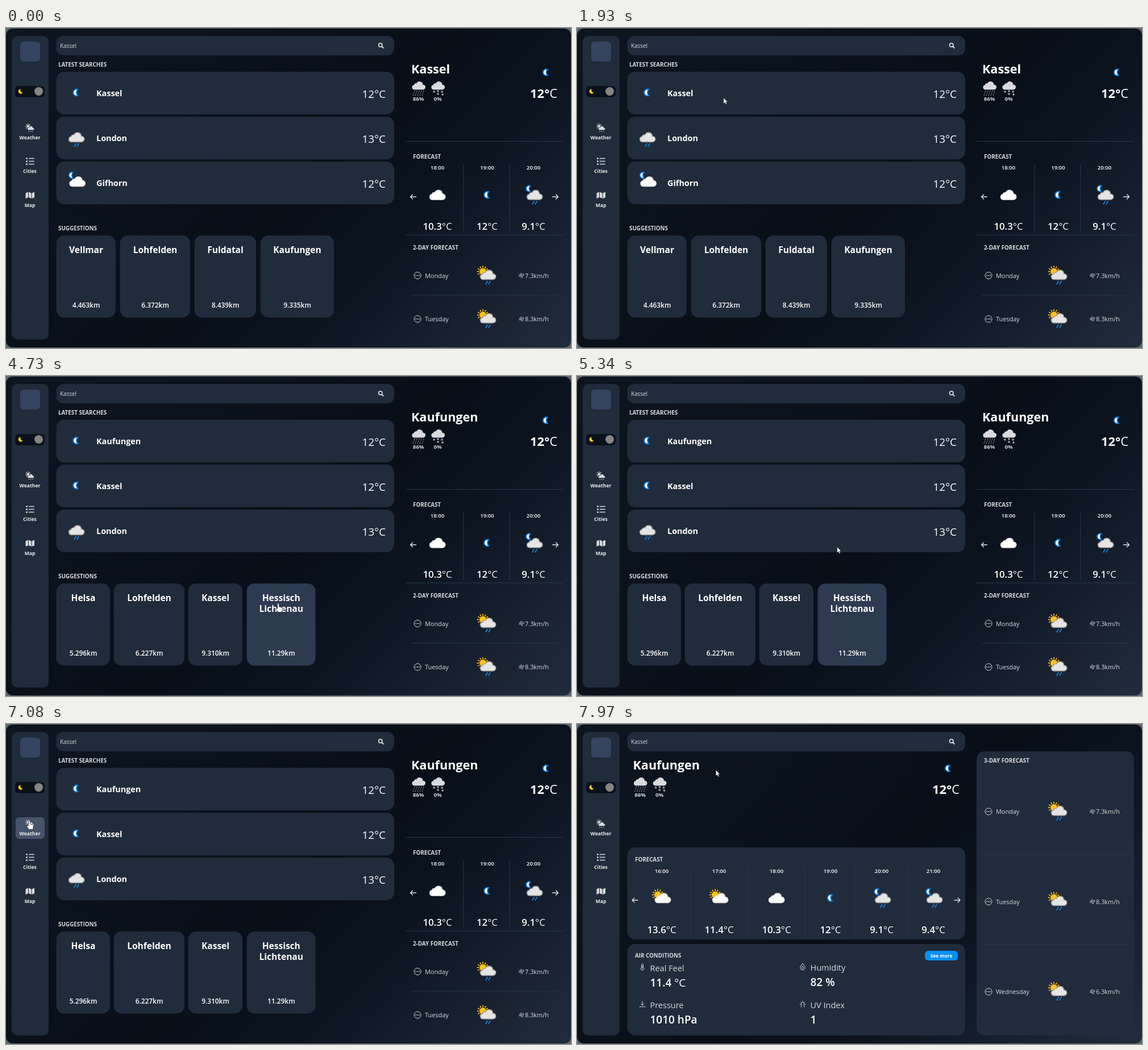
Animation of 994 by 563 pixels, one loop 8000 ms. Source, as an HTML page:

```html
<!DOCTYPE html>
<html lang="en">
<head>
<meta charset="utf-8">
<title>Weather app</title>
<style>
html, body { margin: 0; width: 100%; height: 100%; overflow: hidden; background: #62666c; }
svg { display: block; width: 994px; height: 563px; font-family: "Open Sans", "Noto Sans", sans-serif; }
</style>
</head>
<body>
<svg id="stage" viewBox="0 0 994 563"></svg>
<script>
const CARD = '#202b3b', PALE = '#d8dade';

// Drawing helpers, all returning SVG markup
const at = (x, y, body, more = '') => `<g transform="translate(${x} ${y}) ${more}">${body}</g>`;
const box = (x, y, x2, y2, r = 14, fill = CARD, id = '') =>
  `<rect ${id && `id="${id}"`} x="${x}" y="${y}" width="${x2 - x}" height="${y2 - y}" rx="${r}" fill="${fill}"/>`;
const stroke = (d, color = PALE, w = 1.2) =>
  `<path d="${d}" fill="none" stroke="${color}" stroke-width="${w}" stroke-linecap="round" stroke-linejoin="round"/>`;
const rule = (d, color = '#29384a') => `<path d="${d}" stroke="${color}" fill="none"/>`;
const text = (x, y, s, size, weight = 600, anchor = 'start', fill = '#fff') =>
  `<text x="${x}" y="${y}" font-size="${size}" font-weight="${weight}" text-anchor="${anchor}" fill="${fill}">${s}</text>`;
const mid = (x, y, s, size, weight = 600, fill = '#fff') => text(x, y, s, size, weight, 'middle', fill);
const heading = (x, y, s) => text(x, y, s, 9.8, 700, 'start', PALE);
const unit = s => `<tspan font-weight="400">${s}</tspan>`;
const dots = (points, r, fill = PALE) =>
  points.map(([x, y]) => `<circle cx="${x}" cy="${y}" r="${r}" fill="${fill}"/>`).join('');
const rays = (n, a, b) => Array.from({ length: n }, (_, i) => {
  const q = i * 2 * Math.PI / n, c = Math.cos(q), s = Math.sin(q);
  return `M${(a * c).toFixed(2)} ${(a * s).toFixed(2)}L${(b * c).toFixed(2)} ${(b * s).toFixed(2)}`;
}).join('');

// Weather icons, centred on the cloud
const CLOUD = 'M-9 8.5A4.800 4.800 0 0 1-9.500-1A4.200 4.200 0 0 1-4.500-4A6.800 6.800 0 0 1 8.500-1.500A5 5 0 0 1 9 8.500Z';
const CRESCENT = 'M4-5.500A6 6 0 1 0 4 5.500A7.500 7.500 0 0 1 4-5.500Z';
const cloud = (fill, edge) => `<path d="${CLOUD}" fill="${fill}" stroke="${edge}" stroke-width="1.500"/>`;
const white = cloud('#fff', '#ececec');
const drops = stroke('M-1 11.500l-3 5M4 11.500l-3 5', '#1688e5', 1.6);
const rain = cloud('#e5e5e5', '#9c9c9c') + drops;
const moon = `<path d="${CRESCENT}" fill="#fff" stroke="#0875d1" stroke-width="2"/>`;
const sun = at(-9, -5.5, stroke(rays(12, 7.5, 9.5), '#ffb000', 1.8) + dots([[0, 0]], 6, '#ffc21c'));
const small = at(-11, -11, moon, 'scale(.9)');
const icons = {
  moon, rain, cloud: white,
  moonCloud: small + white,
  moonRain: small + rain,
  sunCloud: sun + cloud('#fff', '#dcdcdc'),
  sunRain: sun + rain
};
const icon = (name, x, y) => at(x, y, icons[name]);

const wind = stroke('M-4-1.700H-.5a1.100 1.100 0 1 0-1.100-1.100M-4.500 0H3a1.300 1.300 0 1 0-1.300-1.300M-4 1.700H1a1.100 1.100 0 1 1-1.100 1.100', PALE, .75);
const arrow = (x, y, dir) => at(x, y, stroke('M-5 0H5M-1-4L-5 0L-1 4', '#e2e4e7', 1.3), `scale(${dir} 1)`);
const flake = (x, y) => at(x, y, stroke(rays(6, 0, 1.8), PALE, .7));

function current(city, x, tempX) {
  const puff = `<path d="${CLOUD}" fill="${PALE}" transform="scale(.87)"/>`;
  let dashes = '';
  for (let row = 0; row < 3; row++)
    for (let i = 0; i < 5; i++) dashes += `M${-7 + i * 4 - row * 1.2} ${9.5 + row * 3.4}l-.5 1.200`;
  return text(x, 80, city, 21.6, 700) +
    at(x + 13, 101, puff + stroke(dashes, PALE, .8)) +
    at(x + 47, 101, puff + flake(-7, 11) + flake(0, 15) + flake(0, 10) + flake(7, 11) + flake(8, 16)) +
    mid(x + 12.5, 128, '86%', 9.5, 700, PALE) + mid(x + 46.5, 128, '0%', 9.5, 700, PALE) +
    at(tempX - 21, 78, moon, 'scale(.95)') +
    text(tempX, 122.500, '12°' + unit('C'), 21.8, 700, 'end');
}

const hour = (x, y, time, name, temp) =>
  mid(x, y, time, 9.6) +
  icon(name, x + ({ moon: -1, moonRain: 2, sunCloud: 2 }[name] || 0), y + 44.5) +
  mid(x, y + 106, temp + unit('°C'), 16.8);

const day = (y, name, speed) =>
  `<circle cx="724" cy="${y}" r="6" fill="none" stroke="${PALE}"/>` +
  dots([[721, y], [724, y], [727, y]], .9) +
  text(737, y + 4, name, 10.9, 400, 'start', PALE) +
  icon('sunRain', 848, y - 1.5) + at(907, y, wind) +
  text(913, y + 4, speed + 'km/h', 10.9, 400, 'start', PALE);

const found = ([name, pic, temp], i) => {
  const y = 77 + i * 79, c = y + 37;
  const pos = pic === 'moon' ? [122.5, c - .5] : pic === 'rain' ? [124, c - 1] : [125.5, c - 2];
  return box(88.5, y, 683, y + 75) + icon(pic, ...pos) +
    text(159, c + 5.5, name, 14.4, 700) + text(668, c + 8.500, temp + '°C', 18.9, 500, 'end');
};

const suggestion = ([x, x2, name, km], i, all) =>
  box(x - .5, 365, x2, 509.5, 14, CARD, all.id + i) +
  name.split(' ').map((s, k) => mid((x + x2) / 2, 396 + k * 18.5, s, 15.5, 700)).join('') +
  mid((x + x2) / 2, 492, km + 'km', 11.9);

const home = (id, city, searches, near) => {
  near.id = id + 'Card';
  return `<g id="${id}">` + heading(92, 67.5, 'LATEST SEARCHES') + searches.map(found).join('') +
    heading(92, 356, 'SUGGESTIONS') + near.map(suggestion).join('') +
    current(city, 713, 970) +
    rule('M703 199.500H980M703 364H980M713 470H971M805 239V360M886 239V360') +
    heading(716, 229.5, 'FORECAST') +
    hour(759, 249, '18:00', 'cloud', '10.3') + hour(846.500, 249, '19:00', 'moon', '12') +
    hour(928, 249, '20:00', 'moonRain', '9.1') +
    arrow(716.5, 297, 1) + arrow(966.5, 297, -1) +
    heading(716, 390, '2-DAY FORECAST') + day(435.500, 'Monday', '7.3') + day(512, 'Tuesday', '8.3') + '</g>';
};

const reading = (x, y, label, value, symbol) =>
  at(x - 13.5, y - 7, symbol) + text(x, y, label, 14.500, 400, 'start', PALE) + text(x, y + 27, value, 19);

const weather = () => {
  const hours = [[149, '16:00', 'sunCloud', '13.6'], [250, '17:00', 'sunCloud', '11.4'], [351, '18:00', 'cloud', '10.3'],
    [446, '19:00', 'moon', '12'], [536, '20:00', 'moonRain', '9.1'], [627, '21:00', 'moonRain', '9.4']];
  return '<g id="weather">' + current('Kaufungen', 98.5, 673) +
    box(88.5, 217, 683, 379) + heading(102, 242, 'FORECAST') +
    rule('M199 250V375M300 250V375M401 250V375M490 250V375M581 250V375', '#2a3748') +
    hours.map(([x, time, name, temp]) => hour(x, 261.5, time, name, temp)).join('') +
    arrow(102, 310, 1) + arrow(669, 310, -1) +
    box(88.5, 387, 683, 548) + heading(102, 411, 'AIR CONDITIONS') +
    box(612, 399, 670, 416, 6, '#0390fc') + mid(641, 411, 'See more', 8.4, 700) +
    reading(128.500, 434.5, 'Real Feel', '11.4 ' + unit('°C'),
      stroke('M-1.500 1V-4a1.500 1.500 0 0 1 3 0V1a2.600 2.600 0 1 1-3 0M0-2V3', PALE, 1)) +
    reading(410.500, 434, 'Humidity', '82 %',
      stroke('M0-5.500C-2-3-4.300-.5-4.300 1.500a4.300 4.300 0 0 0 8.600 0C4.300-.5 2-3 0-5.500M0-1C-3 2-1.500 3.500 0 3.500S3 2 0-1', PALE, 1)) +
    reading(128.500, 500, 'Pressure', '1010 hPa', stroke('M0-5V2M-2.500-.5L0 2L2.500-.5M-5 4.500H5', PALE, 1)) +
    reading(410.500, 500, 'UV Index', '1',
      stroke('M-2.500 2V-1a2.500 2.500 0 0 1 5 0V2M-2.500 5V3M2.500 5V3M-5 0H-4M4 0H5M-3.500-4L-3-3.500M3.500-4L3-3.500M0-5.500V-5', PALE, 1)) +
    box(703, 48, 980, 548) + heading(716, 67.5, '3-DAY FORECAST') +
    rule('M712 230H971M712 388.500H971', '#2a3748') +
    day(154, 'Monday', '7.3') + day(312.5, 'Tuesday', '8.3') + day(471, 'Wednesday', '6.3') + '</g>';
};

const frame = `<defs><linearGradient id="sky" gradientUnits="userSpaceOnUse" x1="108" y1="-108" x2="886.500" y2="670.500">
  <stop stop-color="#0d1520"/><stop offset=".52" stop-color="#080f19"/>
  <stop offset=".67" stop-color="#0b131f"/><stop offset="1" stop-color="#212c3c"/></linearGradient></defs>` +
  box(0, 1, 994, 562, 12, 'url(#sky)') + box(10, 14, 75, 548, 10) +
  box(25, 24, 60, 59, 6, '#34445f') +
  box(16, 102, 68, 122, 6, '#0a111b') + dots([[57.5, 111.5]], 7.5, '#858585') +
  at(25, 112, `<path d="${CRESCENT}" fill="#ffcb14"/>`, 'rotate(-30) scale(.72)') +
  box(17, 164, 68, 202, 6, '#46546a', 'navHover') +
  at(39, 173, stroke(rays(8, 3.2, 4.6), PALE, 1.1) + dots([[0, 0]], 2.4)) +
  at(43.500, 176, `<path d="${CLOUD}" fill="${PALE}" stroke="${CARD}" stroke-width="2" transform="scale(.45)"/>` +
    stroke('M-3 5.500l-.5 1M0 5.500l-.5 1M3 5.500l-.5 1', PALE, 1)) +
  dots([[36.5, 229.5], [36.5, 234.5], [36.5, 239.5]], 1.500) + stroke('M40.500 229.500H49M40.500 234.500H49M40.500 239.500H49', PALE, 1.7) +
  `<path d="M34.500 290.500L39 288.500V298L34.500 300ZM40 288.500L44.500 290.500V300L40 298ZM45.500 290.500L50 288.500V298L45.500 300Z" fill="${PALE}"/>` +
  [['Weather', 196], ['Cities', 255], ['Map', 314.5]].map(([s, y]) => mid(42, y, s, 8.6, 700, '#e8eaed')).join('') +
  box(88.5, 14, 683, 48, 12) + text(95, 34.8, 'Kassel', 9.9, 400, 'start', PALE) +
  `<circle cx="658.700" cy="30" r="3.200" fill="none" stroke="${PALE}" stroke-width="1.700"/>` + stroke('M661.200 32.500L663.700 35', PALE, 2);

const pointer = `<g id="pointer" stroke="#10151c" stroke-width=".7" fill="#fff">
  <path id="tip" d="M0 0V10.500L2.500 8.300L4.100 12L6 11.200L4.400 7.600H7.500Z"/>
  <path id="hand" d="M-1.500 9V1.200a1.400 1.400 0 0 1 2.800 0V6l4.500 1q1.700.5 1.500 2.200l-.8 6.300H-.5L-4.500 10.500q.3-1.900 1.800-1.200Z"/></g>`;

const stage = document.getElementById('stage');
stage.innerHTML = frame +
  home('before', 'Kassel',
    [['Kassel', 'moon', 12], ['London', 'rain', 13], ['Gifhorn', 'moonCloud', 12]],
    [[89, 193, 'Vellmar', '4.463'], [201, 324, 'Lohfelden', '6.372'], [332, 440, 'Fuldatal', '8.439'], [448, 577, 'Kaufungen', '9.335']]) +
  home('after', 'Kaufungen',
    [['Kaufungen', 'moon', 12], ['Kassel', 'moon', 12], ['London', 'rain', 13]],
    [[89, 183, 'Helsa', '5.296'], [190, 314, 'Lohfelden', '6.227'], [321, 416, 'Kassel', '9.310'], [424, 544.5, 'Hessisch Lichtenau', '11.29']]) +
  weather() + pointer;

// Pointer stops: time, x, y
const path = [[460, 880, 553], [1220, 623, 353], [1930, 258, 123], [2060, 225, 105], [2600, 130, 25], [2870, 109, 28],
  [3700, 482, 313], [4130, 479, 400], [5200, 479, 400], [5340, 458, 301], [5800, 210, 125], [5950, 170, 106],
  [6100, 214, 108], [6500, 120, 145], [6870, 41, 170], [7290, 41, 170], [7770, 177, 71], [7890, 214, 86], [7970, 244, 81], [8000, 250, 80]];

const $ = id => document.getElementById(id);
const show = (id, on) => $(id).setAttribute('display', on ? 'inline' : 'none');
const within = (t, a, b) => t >= a && t < b;

function draw(now) {
  const t = now % 8000;
  show('before', t < 4470);
  show('after', within(t, 4470, 7150));
  show('weather', t >= 7150);
  show('navHover', within(t, 6840, 7430));
  $('beforeCard3').setAttribute('fill', t >= 4060 ? '#2d3a50' : CARD);
  $('afterCard3').setAttribute('fill', t < 5410 ? '#2d3a50' : CARD);

  const hand = within(t, 4020, 5270) || within(t, 6840, 7360);
  show('pointer', t >= 460);
  show('hand', hand);
  show('tip', !hand);
  const i = Math.max(1, path.findIndex(p => p[0] > t));
  const [t0, x0, y0] = path[i - 1], [t1, x1, y1] = path[i];
  const k = (t - t0) / (t1 - t0);
  $('pointer').setAttribute('transform', `translate(${x0 + (x1 - x0) * k} ${y0 + (y1 - y0) * k})`);
}

const start = performance.now();
function tick() {
  draw(performance.now() - start);
  requestAnimationFrame(tick);
}
tick();
</script>
</body>
</html>
```
